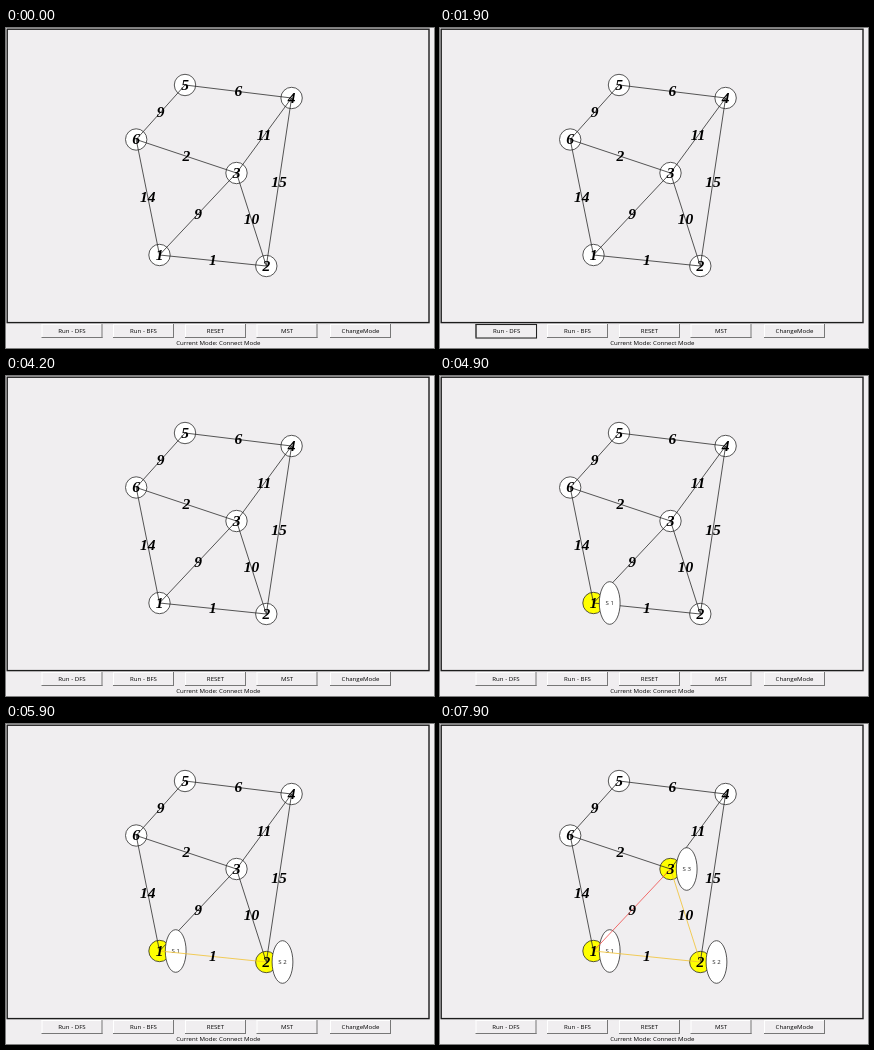
An HTML page with a canvas for the animation above (8000 ms loop, 428 by 320 pixels).

```html
<!DOCTYPE html>
<html lang="en">
<head>
<meta charset="utf-8">
<style>
  html, body { margin: 0; width: 100%; height: 100%; overflow: hidden; background: #f0eef0; }
  canvas { display: block; }
</style>
</head>
<body>
<canvas id="stage" width="428" height="320"></canvas>
<script>
const ctx = document.getElementById('stage').getContext('2d');
const LOOP = 8000;
const BACK = '#f0eef0', INK = '#2c2c2c', YELLOW = '#ffff00', GOLD = '#f2c230', RED = '#f04a48';
const SERIF = 'italic bold 15.5px "Liberation Serif", serif';
const SMALL = '6.1px "Open Sans", sans-serif';

const nodes = {
  1: [153.5, 227], 2: [260.3, 238], 3: [230.5, 145],
  4: [285.6, 70], 5: [179, 57], 6: [130.2, 111.5]
};
const edges = [
  [5, 6, 9], [5, 4, 6], [6, 3, 2], [6, 1, 14], [3, 4, 11],
  [4, 2, 15], [3, 2, 10], [1, 3, 9], [1, 2, 1]
];
// Each step colours an edge and, unless it closes a cycle, visits a node.
const steps = [
  { at: 4900, visit: 1 },
  { at: 5800, visit: 2, edge: [1, 2], color: GOLD },
  { at: 6900, visit: 3, edge: [3, 2], color: GOLD },
  { at: 7900, edge: [1, 3], color: RED }
];
const buttons = [
  [35.5, 'Run - DFS'], [107, 'Run - BFS'], [179, 'RESET'], [250.5, 'MST'], [324, 'ChangeMode']
];

function text(str, x, y, font, color = '#000') {
  ctx.font = font;
  ctx.fillStyle = color;
  ctx.fillText(str, x, y);
}

function line(x1, y1, x2, y2, color, width = 0.8) {
  ctx.strokeStyle = color;
  ctx.lineWidth = width;
  ctx.beginPath();
  ctx.moveTo(x1, y1);
  ctx.lineTo(x2, y2);
  ctx.stroke();
}

function oval(x, y, rx, ry, fill) {
  ctx.beginPath();
  ctx.ellipse(x, y, rx, ry, 0, 0, Math.PI * 2);
  ctx.fillStyle = fill;
  ctx.fill();
  ctx.strokeStyle = INK;
  ctx.lineWidth = 0.8;
  ctx.stroke();
}

function box(x, y, w, h, color, width) {
  ctx.strokeStyle = color;
  ctx.lineWidth = width;
  ctx.strokeRect(x, y, w, h);
}

const link = (a, b, color) => line(...nodes[a], ...nodes[b], color);

function drawGraph(t) {
  const done = steps.filter(step => t >= step.at);
  const visited = id => done.some(step => step.visit === +id);
  const coloured = (a, b) => done.some(({ edge }) => edge && edge[0] === a && edge[1] === b);

  for (const id in nodes) oval(...nodes[id], 10.7, 10.7, visited(id) ? YELLOW : '#fff');
  for (const [a, b] of edges) if (!coloured(a, b)) link(a, b, INK);

  for (const { visit, edge, color } of done) {
    if (edge) link(...edge, color);
    if (!visit) continue;
    const [x, y] = nodes[visit];
    oval(x + 16.2, y, 10.4, 21.3, '#fff');
    text('S ' + visit, x + 16.2, y + 0.3, SMALL, '#222');
  }

  for (const id in nodes) text(id, nodes[id][0], nodes[id][1] + 0.8, SERIF);
  for (const [a, b, weight] of edges) {
    const [x1, y1] = nodes[a], [x2, y2] = nodes[b];
    text(weight, (x1 + x2) / 2, (y1 + y2) / 2 + 0.8, SERIF);
  }
}

function drawButton(x, label, focused, pressed) {
  const y = 296, w = 61, h = 14;
  const light = pressed ? '#858585' : '#fff';
  const dark = pressed ? '#fff' : '#777';
  line(x, y + 0.5, x + w, y + 0.5, light, 1);
  line(x + 0.5, y, x + 0.5, y + h, light, 1);
  line(x, y + h - 0.5, x + w, y + h - 0.5, dark, 1);
  line(x + w - 0.5, y, x + w - 0.5, y + h, dark, 1);
  if (focused) box(x + 0.5, y + 0.5, w - 0.5, h - 0.5, '#222', 1.1);
  const shift = pressed ? 0.6 : 0;
  text(label, x + w / 2 + shift, y + 7 + shift, SMALL);
}

function draw(t) {
  ctx.fillStyle = BACK;
  ctx.fillRect(0, 0, 428, 320);
  ctx.textAlign = 'center';
  ctx.textBaseline = 'middle';

  box(1.2, 1.2, 421.8, 293.4, '#1c1c1c', 1.4);
  drawGraph(t);

  buttons.forEach(([x, label], i) => {
    const focused = i === 0 && t >= 800 && t < 2100;
    drawButton(x, label, focused, focused && t >= 1900);
  });
  text('Current Mode: Connect Mode', 212.3, 315, SMALL);
}

const start = performance.now();
function tick() {
  draw((performance.now() - start) % LOOP);
  requestAnimationFrame(tick);
}
tick();
</script>
</body>
</html>
```
